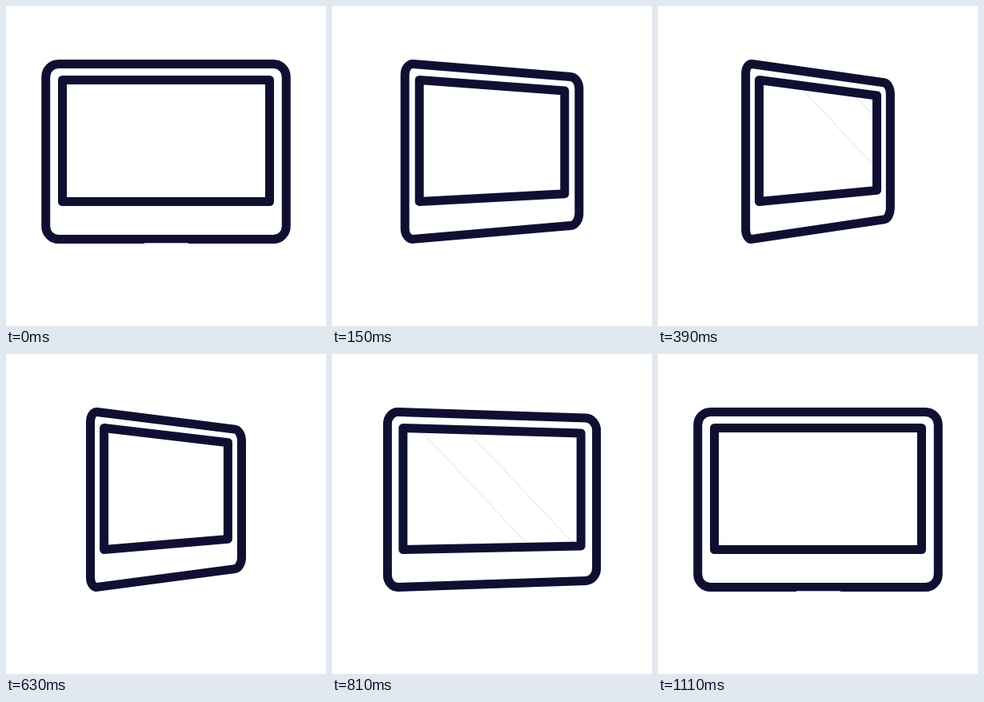
An HTML page that plays this animation: 400x400 px, repeating every 1.2 s.

```html
<!DOCTYPE html>
<html lang="en">
<head>
<meta charset="utf-8">
<title>Turning screen</title>
<style>
  html, body { margin: 0; width: 100%; height: 100%; overflow: hidden; background: #fff; }
  svg { display: block; width: 100vw; height: 100vh; }
  .frame { fill: none; stroke: #0f1031; stroke-width: 11; stroke-linejoin: round; }
  .glint { fill: none; stroke: #d2d2d8; stroke-width: .7; }
</style>
</head>
<body>
<svg viewBox="0 0 400 400">
  <clipPath id="glass"><path id="pane"/></clipPath>
  <path id="glint" class="glint" clip-path="url(#glass)"/>
  <path id="screen" class="frame"/>
  <path id="body" class="frame"/>
  <rect x="173" y="296.3" width="55" height="2" fill="#fff"/>
</svg>
<script>
const LOOP = 1200, STEP = 30, LAST = 1110;
const TURN = 450;            // time of the widest turn
const SLOPE = 1.06, MID_Y = 168, GAP = 58;

// Corners run clockwise from the top left: facing front, then turned.
const BODY = [
  [[49.75, 72.5], [350.25, 72.5], [350.25, 291.5], [49.75, 291.5]],
  [[110, 71.4], [290, 97], [290, 265.5], [110, 292.6]]
];
const SCREEN = [
  [[70.5, 92.5], [329.5, 92.5], [329.5, 244.5], [70.5, 244.5]],
  [[126.8, 92.5], [273.2, 112.2], [273.2, 230.3], [126.8, 244.5]]
];

const el = id => document.getElementById(id);
const mix = (a, b, k) => a + (b - a) * k;
const morph = ([from, to], k) =>
  from.map((p, i) => p.map((v, j) => mix(v, to[i][j], k)));
const fmt = p => p.map(v => v.toFixed(2)).join(' ');
const clamp = v => Math.min(1, Math.max(0, v));
const smooth = v => v * v * (3 - 2 * v);

// Cubic ease with control points (x1, 0) and (x2, 1).
function ease(u, x1, x2) {
  let lo = 0, hi = 1;
  for (let i = 0; i < 30; i++) {
    const s = (lo + hi) / 2, r = 1 - s;
    if (3 * r * r * s * x1 + 3 * r * s * s * x2 + s * s * s < u) lo = s;
    else hi = s;
  }
  return smooth((lo + hi) / 2);
}

const turnAt = t => ease(clamp(1 - Math.abs(t - TURN) / TURN), .33, 0);

function toward(p, q, r) {
  const dx = q[0] - p[0], dy = q[1] - p[1], len = Math.hypot(dx, dy);
  return [p[0] + dx / len * r, p[1] + dy / len * r];
}

const polygon = pts => 'M' + pts.map(fmt).join('L') + 'Z';

function rounded(pts, rx, ry) {
  return pts.map((p, i) => {
    const prev = pts[(i + 3) % 4], next = pts[(i + 1) % 4];
    const [rIn, rOut] = i % 2 ? [rx, ry] : [ry, rx];
    const curve = [
      toward(p, prev, rIn * .45), toward(p, next, rOut * .45), toward(p, next, rOut)
    ];
    return (i ? 'L' : 'M') + fmt(toward(p, prev, rIn)) + 'C' + curve.map(fmt).join(' ');
  }).join('') + 'Z';
}

// A pair of slanted lines sweeping from left to right.
function sweep(t, start, end) {
  if (t <= start || t >= end) return '';
  const x = mix(-15, 415, smooth((t - start) / (end - start)));
  const reach = 100;
  return [-GAP / 2, GAP / 2].map(d =>
    'M' + fmt([x + d - reach, MID_Y - reach * SLOPE]) +
    'L' + fmt([x + d + reach, MID_Y + reach * SLOPE])).join('');
}

function draw(t) {
  const k = turnAt(t);
  const pane = polygon(morph(SCREEN, k));
  el('screen').setAttribute('d', pane);
  el('pane').setAttribute('d', pane);
  el('body').setAttribute('d', rounded(morph(BODY, k), mix(16, 8, k), mix(16, 13, k)));
  el('glint').setAttribute('d', sweep(t, 70, 595) + sweep(t, 495, LAST));
}

const begin = performance.now();
function tick() {
  const t = (performance.now() - begin) % LOOP;
  draw(Math.min(LAST, Math.floor(t / STEP) * STEP));
  requestAnimationFrame(tick);
}
tick();
</script>
</body>
</html>
```
